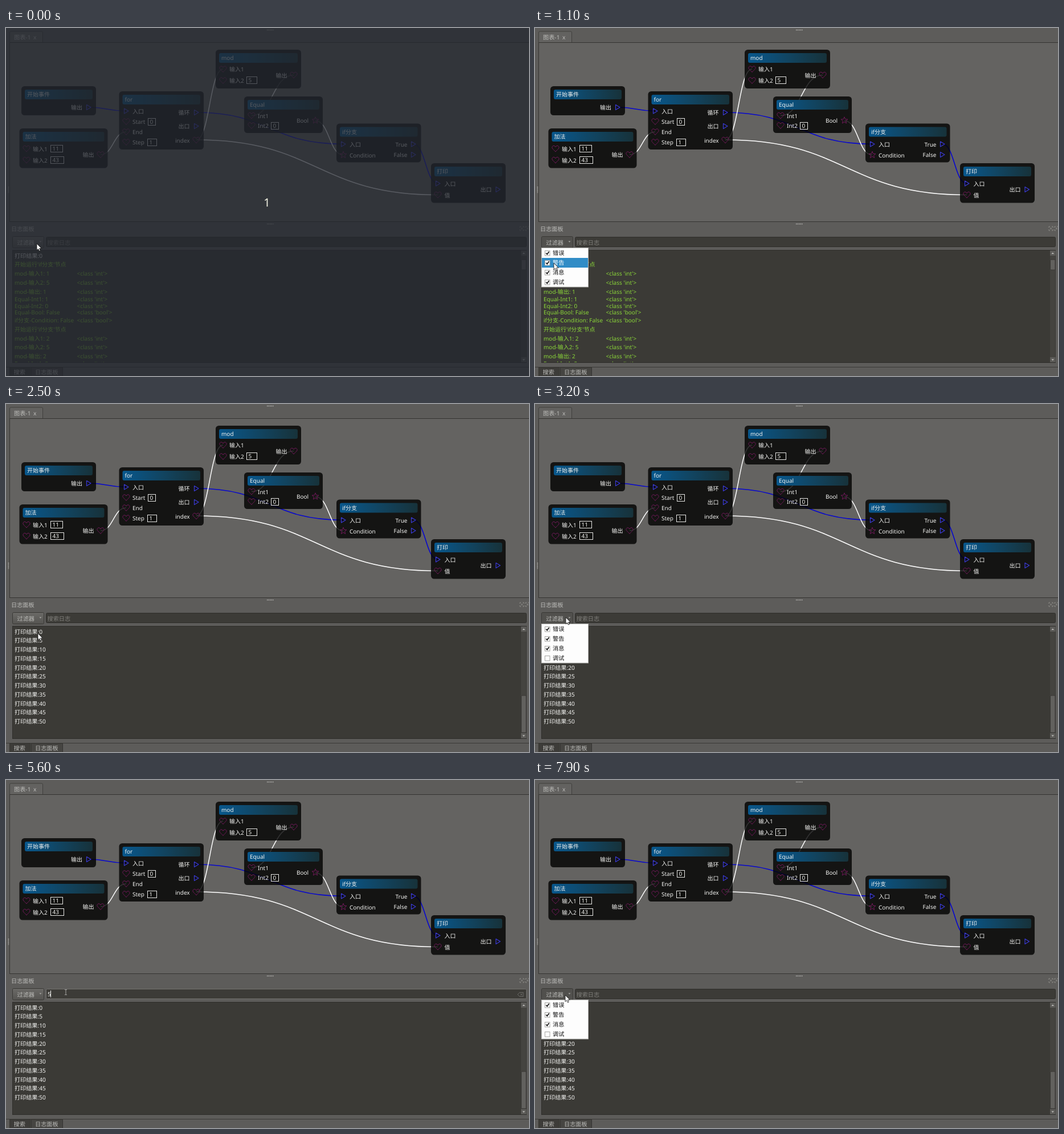
Animation of 918x610 px, one loop 8 s. Source, as an HTML page:

```html
<!DOCTYPE html>
<html lang="zh-CN">
<head>
<meta charset="utf-8">
<title>节点图与日志</title>
<style>
html, body { margin: 0; width: 100%; height: 100%; overflow: hidden; background: #5d5c5a; }
svg { display: block; width: 918px; height: 610px; }
text { font: 10px "Noto Sans", "Noto Sans CJK SC", "Noto Sans CJK", sans-serif; text-rendering: geometricPrecision; white-space: pre; fill: #f4f4f2; }
text.ui { font-size: 10.2px; fill: #bdbdba; }
text.dim { font-size: 10.2px; fill: #82817d; }
text.print { font-size: 10.15px; }
text.debug { fill: #8bd739; }
text.item { font-size: 10.2px; fill: #111; }
text.on { fill: #fff; }
.wire { fill: none; stroke: #fff; stroke-width: 1.5; }
.flow { stroke: #0606cf; stroke-width: 1.6; }
.port { fill: none; stroke: #72195a; stroke-width: 1; stroke-linejoin: round; }
.tri { stroke: #3a3ad6; stroke-width: 1.2; }
</style>
</head>
<body>
<svg id="stage" viewBox="0 0 918 610">
  <defs>
    <linearGradient id="head"><stop offset="0" stop-color="#08578c"/><stop offset=".5" stop-color="#114562"/><stop offset="1" stop-color="#17323a"/></linearGradient>
    <linearGradient id="btn" x2="0" y2="1"><stop offset="0" stop-color="#6b6a67"/><stop offset="1" stop-color="#555451"/></linearGradient>
    <clipPath id="logClip"><rect x="12" y="391" width="891" height="195"/></clipPath>
  </defs>
  <rect width="918" height="610" fill="#5d5c5a"/>
  <path d="M6.5 25.5V8q0-2 2-2H62.5q2 0 2 2V25.5" fill="#636260" stroke="#40403d"/>
  <text class="ui" x="14" y="20">图表-1</text><text class="ui" x="48" y="20">x</text>
  <rect x="6.5" y="25.5" width="914" height="314" fill="#646361" stroke="#353431"/>
  <path d="M458 3.5h12M458 343.5h12" stroke="#b4b3b0" stroke-width="1.5" stroke-dasharray="1.5 1"/>
  <path d="M4.5 278v11" stroke="#aaa9a6" stroke-width="1.5" stroke-dasharray="1.5 1"/>
  <g id="wires"></g>
  <g id="nodes"></g>

  <text class="ui" x="9" y="356">日志面板</text>
  <g fill="none" stroke="#92918e" stroke-width=".9">
    <path d="M902 350v-2h2M907 348h2v2M909 353v2h-2M904 355h-2v-2M904 350l3 3M907 350l-3 3"/>
    <path d="M912 350v-2h2M916 348h2M912 353v2h2M914 350l3 3M917 350l-3 3"/>
  </g>
  <rect id="button" x="11.5" y="365.5" width="55" height="20" rx="2" fill="url(#btn)" stroke="#393835"/>
  <text class="ui" x="19.5" y="379.5">过滤器</text>
  <path d="M58.5 373.5h4l-2 2.3z" fill="#aaa9a6"/>
  <rect id="search" x="70.5" y="366.5" width="843" height="17" rx="2" fill="#3c3b37"/>
  <text id="hint" class="dim" x="72.5" y="379.5">搜索日志</text>
  <text id="query" x="73" y="379">5</text>
  <path id="caret" d="M0 369v12" stroke="#f0f0ee"/>
  <g id="clear" fill="none" stroke="#bdbcb8" stroke-width=".9">
    <path d="M898 376l3.5-3.5h6.5v7h-6.5zM903 374.3l3.2 3.4M906.2 374.3l-3.2 3.4"/>
  </g>
  <rect x="11.5" y="389.5" width="902" height="197" fill="#3b3a36" stroke="#2e2d2a"/>
  <g id="log" clip-path="url(#logClip)"></g>
  <rect x="904" y="390" width="9.5" height="196" fill="#454440"/>
  <path d="M904 390h9.5v9h-9.5zM904 577h9.5v9h-9.5z" fill="#5d5c59"/>
  <path d="M906.5 396h4.5l-2.25-2.6zM906.5 580.5h4.5l-2.25 2.6z" fill="#c0bfbc"/>
  <rect id="thumb" x="904.5" width="8.5" rx="1.5" fill="#62615e" stroke="#383734"/>

  <path d="M0 594.5H918" stroke="#3b3a37"/>
  <path d="M6.5 610V595h36.5v15" fill="#3d3c39" stroke="#353431"/>
  <path d="M44.5 610V595h55v15" fill="#464542" stroke="#353431"/>
  <text class="ui" x="13.5" y="607">搜索</text><text class="ui" x="51" y="607">日志面板</text>

  <g id="menu"></g>
  <g id="intro">
    <rect width="918" height="610" fill="#22262e" opacity=".75"/>
    <text x="458" y="312.5" text-anchor="middle" style="font-size:20px;fill:#f5f5e4">1</text>
  </g>
  <path id="arrow" d="M0 0V11.5L2.6 9.2 4.4 13 6.3 12.2 4.6 8.4H8.2Z" fill="#fff" stroke="#111" stroke-width=".8"/>
  <path id="beam" d="M-2-4.5h1.5l.5.5.5-.5h1.5M0-4V4M-2 4.5h1.5l.5-.5.5.5h1.5" fill="none" stroke="#b4b4b1" stroke-width=".9"/>
</svg>
<script>
const $ = id => document.getElementById(id);
const label = (x, y, s, cls = '') => `<text class="${cls}" x="${x}" y="${y}">${s}</text>`;

// Wires: bezier with both handles at the middle x
const wire = (x1, y1, x2, y2, cls = '') => {
  const m = (x1 + x2) / 2;
  return `<path class="wire ${cls}" d="M${x1} ${y1}C${m} ${y1} ${m} ${y2} ${x2} ${y2}"/>`;
};
$('wires').innerHTML =
  wire(145, 139, 211, 145.5, 'flow') + wire(334, 148, 592, 203.5, 'flow') +
  wire(715, 203.5, 758, 272.5, 'flow') + wire(166, 222, 211, 182) +
  wire(334, 196, 381, 72) + wire(334, 196, 758, 292.5) +
  wire(505, 82.5, 431, 153.5) + wire(543, 162.5, 592, 222.5);

const star = Array.from({ length: 10 }, (_, i) => {
  const r = i % 2 ? 2.7 : 6.2, a = i * Math.PI / 5 - Math.PI / 2;
  return (r * Math.cos(a)).toFixed(2) + ' ' + (r * Math.sin(a)).toFixed(2);
}).join('L');
const shapes = {
  tri: 'M-3.5-4.5L4 0-3.5 4.5Z',
  heart: 'M0 5.5C-2 2.8-3.6 1.8-4.8.5C-7.5-2-5.5-5.3-3-5.2Q-1-5 0-2.8Q1-5 3-5.2C5.5-5.3 7.5-2 4.8.5C3.6 1.8 2 2.8 0 5.5Z',
  star: `M${star}Z`
};
const node = (x, y, w, h, title) =>
  `<rect x="${x}" y="${y}" width="${w}" height="${h}" rx="5.5" fill="#000" fill-opacity=".8"/>
   <rect x="${x + 6}" y="${y + 6}" width="${w - 12}" height="17" rx="3" fill="url(#head)"/>` +
  label(x + 10, y + 18.4, title);
const port = (kind, x, y, tx, s) =>
  `<path class="port ${kind}" transform="translate(${x} ${y - .5})" d="${shapes[kind]}"/>` + label(tx, y + 3.8, s);
const field = (x, y, w, s) =>
  `<rect x="${x}" y="${y}" width="${w}" height="12" fill="#10100e" stroke="#e8e8e6"/>` + label(x + 3, y + 9.8, s);

$('nodes').innerHTML =
  node(27, 102, 131, 51, '开始事件') + port('tri', 145, 139.5, 114, '输出') +
  node(23.5, 176, 155, 69.5, '加法') +
  port('heart', 36, 212, 47, '输入1') + field(78.5, 205.5, 21, '11') +
  port('heart', 36, 232, 47, '输入2') + field(78.5, 225.5, 23, '43') +
  port('heart', 166, 222.5, 134.5, '输出') +
  node(198.5, 111, 148.5, 102, 'for') +
  port('tri', 211, 146, 222, '入口') + port('heart', 211, 164.5, 222, 'Start') + field(249.5, 158.5, 13, '0') +
  port('heart', 211, 182.5, 222, 'End') + port('heart', 211, 200.5, 222, 'Step') + field(248.5, 194.5, 16, '1') +
  port('tri', 334, 148.5, 302.5, '循环') + port('tri', 334, 172.5, 302.5, '出口') + port('heart', 334, 197, 297, 'index') +
  node(368, 38, 150, 68, 'mod') +
  port('heart', 381, 72.5, 392, '输入1') + port('heart', 381, 92.5, 392, '输入2') + field(422.5, 85.5, 18, '5') +
  port('heart', 505, 83, 473.5, '输出') +
  node(418, 120, 138, 64, 'Equal') +
  port('heart', 431, 154, 442, 'Int1') + port('heart', 431, 171.5, 442, 'Int2') + field(465.5, 165.5, 13, '0') +
  port('star', 543, 162.5, 510, 'Bool') +
  node(580, 167.5, 148.5, 68, 'if分支') +
  port('tri', 592, 204, 603, '入口') + port('star', 592, 223, 603, 'Condition') +
  port('tri', 715, 204, 683.5, 'True') + port('tri', 715, 222.5, 680.5, 'False') +
  node(746, 237, 131, 69.5, '打印') +
  port('tri', 758, 273, 769.5, '入口') + port('heart', 758, 293, 769.5, '值') +
  port('tri', 863.5, 283.5, 832.5, '出口');

// Log contents
const pass = n => [
  ["开始运行'if分支'节点", '', 15.8],
  ['mod-输入1: ' + n, 'int', 15.8], ['mod-输入2: 5', 'int', 15.8], ['mod-输出: ' + n, 'int', 13],
  ['Equal-Int1: ' + n, 'int', 11.7], ['Equal-Int2: 0', 'int', 11.7],
  ['Equal-Bool: False', 'bool', 14], ['if分支-Condition: False', 'bool', 15.5]
];
function debugLog() {
  let y = 418.4, out = label(15, 402.5, '打印结果:0', 'print');
  for (const [s, type, step] of [...pass(1), ...pass(2)]) {
    out += label(15, y, s, 'debug');
    if (type) out += label(124.5, y, `&lt;class '${type}'&gt;`, 'debug');
    y += step;
  }
  return out;
}
const printLog = list => list.map((n, i) => label(15, 402.5 + i * 15.75, '打印结果:' + n, 'print')).join('');
const all = Array.from({ length: 11 }, (_, i) => i * 5);
const logs = {
  debug: [debugLog(), 406, 18],
  info: [printLog(all), 511, 65],
  match: [printLog(all.filter(n => String(n).includes('5'))), 532, 44]
};

function menu(hover, debugOn) {
  return '<rect x="11.5" y="385.5" width="82" height="68.5" fill="#fdfdfd" stroke="#b5b5b2"/>' +
    ['错误', '警告', '消息', '调试'].map((s, i) => {
      const y = 386 + i * 17, checked = i < 3 || debugOn;
      return (i === hover ? `<rect x="12" y="${y}" width="81" height="17" fill="#308cc6"/>` : '') +
        `<rect x="17.5" y="${y + 4.5}" width="8.5" height="8.5" fill="#fff" stroke="#a5a5a2"/>` +
        (checked ? `<path d="M19.3 ${y + 8.5}l2 2.3 3.2-4.8" fill="none" stroke="#111" stroke-width="1.6"/>` : '') +
        label(31, y + 12.4, s, i === hover ? 'item on' : 'item');
    }).join('');
}

// Pointer stops: time, x, y
const track = [
  [0, 54, 378], [800, 46, 391], [900, 37, 404], [1100, 33, 412], [1200, 29, 424], [1300, 26, 438],
  [1400, 24, 446], [1700, 24, 442], [2200, 27, 437], [2300, 35, 425], [2400, 46, 412], [2500, 56, 402],
  [2600, 60, 398], [2800, 57, 384], [2900, 54, 374], [4100, 66, 373], [4200, 90, 372], [4300, 105, 372],
  [7500, 96, 373], [7600, 80, 374], [7700, 63, 376], [7800, 53, 377]
];
const within = (t, a, b) => t >= a && t < b;
const show = (id, on) => $(id).setAttribute('visibility', on ? 'visible' : 'hidden');
const cache = {};
function fill(id, html) {
  if (cache[id] !== html) $(id).innerHTML = cache[id] = html;
}

function draw(now) {
  const t = now % 8000;
  const [, x, y] = track.filter(p => p[0] <= t).pop();
  const typed = within(t, 5600, 7300);
  const focused = within(t, 4400, 7900);
  const open = within(t, 600, 1800) || within(t, 3200, 3900) || t >= 7900;
  const row = Math.floor((y - 386) / 17);

  show('intro', t < 500);
  fill('menu', open ? menu(row, t < 1700) : '');
  $('button').setAttribute('fill', open ? '#51504d' : 'url(#btn)');
  $('search').setAttribute('stroke', focused ? '#72716e' : '#2f2e2b');

  const [html, top, height] = logs[t < 2000 ? 'debug' : within(t, 5700, 7300) ? 'match' : 'info'];
  fill('log', html);
  $('thumb').setAttribute('y', top);
  $('thumb').setAttribute('height', height);

  show('hint', !typed);
  show('query', typed);
  show('caret', within(t, 4400, 5000) || within(t, 5600, 6200) || within(t, 6900, 7900));
  $('caret').setAttribute('transform', `translate(${typed ? 78.5 : 72.5} 0)`);
  show('clear', typed);
  $('clear').setAttribute('opacity', t < 5700 ? .4 : t < 6000 ? .9 : 1);

  const text = x > 70 && y < 385;
  show('arrow', !text);
  show('beam', text);
  $(text ? 'beam' : 'arrow').setAttribute('transform', `translate(${x} ${y})`);
}
function loop() {
  draw(performance.now());
  requestAnimationFrame(loop);
}
loop();
</script>
</body>
</html>
```
